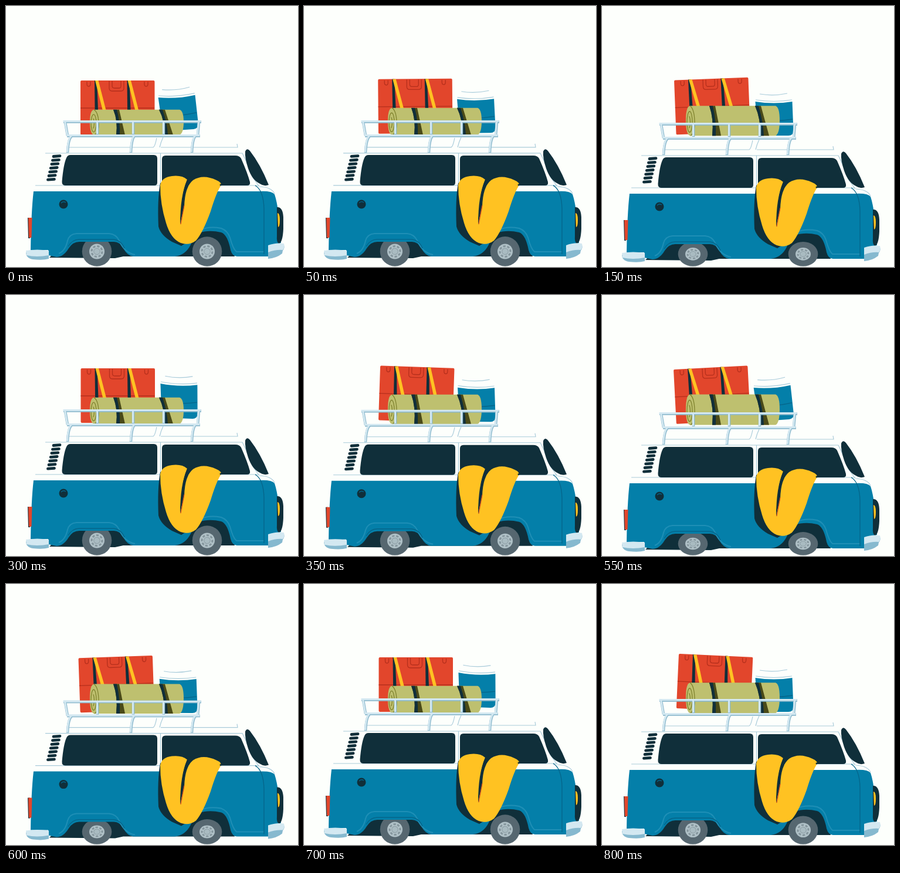
Animation, 498 px wide and 445 px high, one loop 850 ms. Source, as an HTML page:

```html
<!DOCTYPE html>
<html lang="en">
<head>
<meta charset="utf-8">
<title>Bouncing van</title>
<style>
  html, body { margin: 0; width: 100%; height: 100%; overflow: hidden; background: #fdfffc; }
  svg { display: block; width: 498px; height: 445px; }
  .dark { fill: #102f3a; }
  .blue { fill: #047fa9; }
  .pale { fill: #d3e8f1; }
  .steel { fill: #86b9cf; }
  .yellow { fill: #ffc222; }
  .line { fill: none; stroke: #a9cbda; stroke-width: 1.2; }
  .seam { fill: none; stroke: #05658a; stroke-width: 1.3; }
  .shine { fill: none; stroke: #1f8fb6; stroke-width: 2; }
  .crease { fill: none; stroke: #b52f1c; stroke-width: 1.3; }
  .curl { fill: none; stroke: #80832f; stroke-width: 1.3; }
  .strap { fill: #4a4a18; }
</style>
</head>
<body>
<svg viewBox="0 0 498 445">
  <defs>
    <g id="strap">
      <path class="dark" d="M-1 0H3L5 50V92H0Z"/>
      <path class="yellow" d="M0 0H5.500L30 95H24Z"/>
    </g>
    <g id="wheel">
      <circle r="25.3" fill="#566770"/>
      <circle r="13" fill="#b0c1c7"/>
      <g class="spin">
        <circle r="9" fill="none" stroke="#84959c" stroke-width="3" stroke-dasharray="4.2 2.87"/>
        <circle r="5.3" fill="#a9bbc1" stroke="#8b9ca3"/>
      </g>
    </g>
    <g id="bars" fill="none">
      <path d="M112 222Q106 227 105 250M219 222Q214 227 213 250M323 222Q318 227 317 250M101 198L105 221M156 198V219M217 198V219M269 198V219M329 198L327 221M104 221.500H331M98 197.500H333"/>
    </g>
  </defs>

  <g id="bucket">
    <path fill="#fdfffc" d="M3 -12Q30 -7 57 -12L62 3Q31 8 0 3Z"/>
    <path class="line" d="M7 -11Q30 -7 54 -12M0 -1Q31 4 62 -1"/>
    <path class="blue" d="M-.5 2Q31 7 62.500 2L64.500 52Q64 60 56 60H8Q3 60 3 52Z"/>
    <path class="seam" d="M2 33Q33 37 63 32"/>
  </g>

  <g id="case">
    <rect width="126.500" height="93" rx="2" fill="#e2462c"/>
    <path class="crease" d="M0 47H126M49 1V13Q49 18 54 18H69Q74 18 74 13V1M54 1V9Q54 13 58 13H66Q69 13 69 9V1M11 2V6Q11 10 14 10T17 6V2M109 2V6Q109 10 112 10T115 6V2"/>
    <use href="#strap" x="25"/>
    <use href="#strap" x="80.500"/>
  </g>

  <g id="roll">
    <path fill="#bec06f" d="M150 -43H296Q303 -41 303 -22T296 0H150Q143 -2 143 -22T150 -43Z"/>
    <path class="curl" d="M150 -43Q157 -39 158 -22T151 0"/>
    <ellipse class="curl" cx="149.500" cy="-20" rx="4.500" ry="15"/>
    <path class="curl" d="M149 -28Q152 -20 149 -11"/>
    <path class="strap" d="M183 -43H193L203 0H188Q191 -24 183 -43ZM261 -43H271L285 0H270Q271 -24 261 -43Z"/>
    <path class="dark" d="M183 -43H189Q195 -20 194 0H188Q191 -24 183 -43ZM261 -43H267Q275 -20 276 0H270Q271 -24 261 -43Z"/>
  </g>

  <g class="ride">
    <path class="dark" d="M74 429L104 400H318L328 380H378L390 427H330L280 427L200 427L186 430Z"/>
  </g>
  <g class="squash" data-x="155"><use href="#wheel"/></g>

  <g class="ride">
    <path class="line" d="M107 241H251Q254 240 257 225M262 241Q264 232 268 224M264 241H395L394 235"/>
    <use href="#bars" stroke="#8dbace" stroke-width="4.500"/>
    <use href="#bars" stroke="#d3e8f1" stroke-width="3" x="-.5" y="-.9"/>
    <path class="line" d="M67 251H403Q412 268 420 291L432 308M263.500 251V306M50 306H432"/>
    <path class="dark" d="M110 254H252Q258 254 258 260V301Q258 306 253 306H101Q95 306 95.500 299Q98 270 103 259Q105 254 110 254Z
      M272 255H391Q398 255 401 260Q412 285 416 300Q417 306 411 306H271Q266 306 266 301V261Q266 255 272 255Z
      M408 248Q411 241 416 247Q434 270 448 305Q440 308 433 303Q420 297 413 277Q407 259 408 248Z"/>
    <g id="vents" stroke="#102f3a" stroke-width="4.800" stroke-linecap="round"></g>

    <path class="blue" d="M47 316H433Q453 315 458 321Q466 345 469 404L447 409V427H394Q386 427 383 416Q378 390 367 386Q346 381 329 387Q322 391 315 407Q306 425 288 427H217Q207 426 200 413Q194 402 184 402H125Q114 402 107 413Q98 428 86 428L72 425V416H42Q43 350 47 316Z"/>
    <path class="shine" d="M90 422Q101 418 105 400Q108 389 120 388H176Q188 389 193 400Q202 421 220 424M331 382Q346 375 367 379Q378 383 382 395Q387 414 393 419H440"/>
    <path class="seam" d="M425 306Q439 314 440 345V423M106 410Q113 398 125 398H183Q196 399 202 413"/>
    <path class="line" d="M433 308Q453 309 458 320"/>
    <path class="dark" d="M37 361H41V396H38ZM462 343Q472 342 473 360V380Q472 402 466 405Q461 404 462 392Z"/>
    <path fill="#e2462c" d="M38 361H44.500L43.500 395H39Z"/>
    <path class="yellow" d="M463 353Q467 353 467 365T464 377Z"/>
    <circle class="dark" cx="98" cy="338" r="7.500"/>
    <path class="seam" d="M94 336Q97 332 102 335"/>
    <path class="steel" d="M34 420H73V431Q63 434 46 432Q34 430 34 420ZM447 412L474 408Q476 412 472 417L471 422Q461 430 447 431Z"/>
    <path class="pale" d="M34 417Q53 414 73 417V425Q52 429 35 425ZM447 408Q460 403 474 405Q476 412 472 416Q460 415 447 420Z"/>
  </g>

  <g class="squash" data-x="343"><use href="#wheel"/></g>

  <g class="ride">
    <path class="dark" d="M263 302Q258 330 260 376Q264 391 283 402L299 409L330 390L310 300L318 290Z"/>
    <path class="yellow" d="M263 306Q265 292 283 290Q300 288 309 296Q301 315 299 344L297 372Q299 362 304 342Q305 308 319 297Q336 286 359 297Q369 301 366 307Q358 320 349 350Q336 386 324 400Q312 409 298 404Q281 397 273 370Q263 338 263 306Z"/>
    <path class="dark" d="M309 296L314 291L317 298Q304 311 301 347L297 373Q297 323 309 296Z"/>
    <path d="M304 340L298 372" stroke="#d9531e" stroke-width="1.300"/>
    <circle class="dark" cx="366" cy="305" r="1.500"/>
  </g>
</svg>
<script>
const LOOP = 850, BOUNCE = LOOP / 2, STEP = 50;

// phase ms, body drop, case x y tilt, roll height, bucket x y tilt
const poses = [
  [0, 0, 127, 127, 0, 43, 260, 154, -4],
  [25, -1, 127, 124.5, 0, 45, 262, 157, 0],
  [125, 5, 122, 127, -3, 52, 259, 156, -4],
  [150, 4, 123, 126.5, -2.2, 51, 262, 161, 0],
  [275, 0, 127.5, 125, 0, 46, 264, 149, 2],
  [300, 0, 127.5, 125, 0, 45, 264, 149, 2],
  [375, 1, 131, 119, 2.6, 52, 262, 158, 0]
];
poses.push([BOUNCE, ...poses[0].slice(1)]);

const $ = id => document.getElementById(id);
const place = (el, transform) => el.setAttribute('transform', transform);
const each = (selector, fn) => document.querySelectorAll(selector).forEach(fn);

for (let i = 0; i < 7; i++) {
  const x = 81 - i * 1.6, y = 256.5 + i * 6.6;
  $('vents').innerHTML += `<path d="M${x} ${y}l11 -.8"/>`;
}

function poseAt(phase) {
  const next = poses.findIndex(p => p[0] > phase);
  const a = poses[next - 1], b = poses[next];
  const k = (phase - a[0]) / (b[0] - a[0]);
  const ease = k * k * (3 - 2 * k);
  return a.map((v, i) => v + (b[i] - v) * ease);
}

function draw(now) {
  const time = Math.floor(now % LOOP / STEP) * STEP;
  const [, drop, caseX, caseY, caseTilt, rollHeight, bucketX, bucketY, bucketTilt] = poseAt(time % BOUNCE);
  each('.ride', el => place(el, `translate(0 ${drop})`));
  each('.squash', el => place(el, `translate(${el.dataset.x} 444) scale(1 ${1 - drop * .043}) translate(0 -25.5)`));
  each('.spin', el => place(el, `rotate(${time / LOOP * 360})`));
  place($('case'), `translate(${caseX} ${caseY}) rotate(${caseTilt})`);
  place($('roll'), `translate(0 ${219.8 + drop * .35}) scale(1 ${rollHeight / 43})`);
  place($('bucket'), `translate(${bucketX} ${bucketY}) rotate(${bucketTilt})`);
  requestAnimationFrame(draw);
}
requestAnimationFrame(draw);
</script>
</body>
</html>
```
